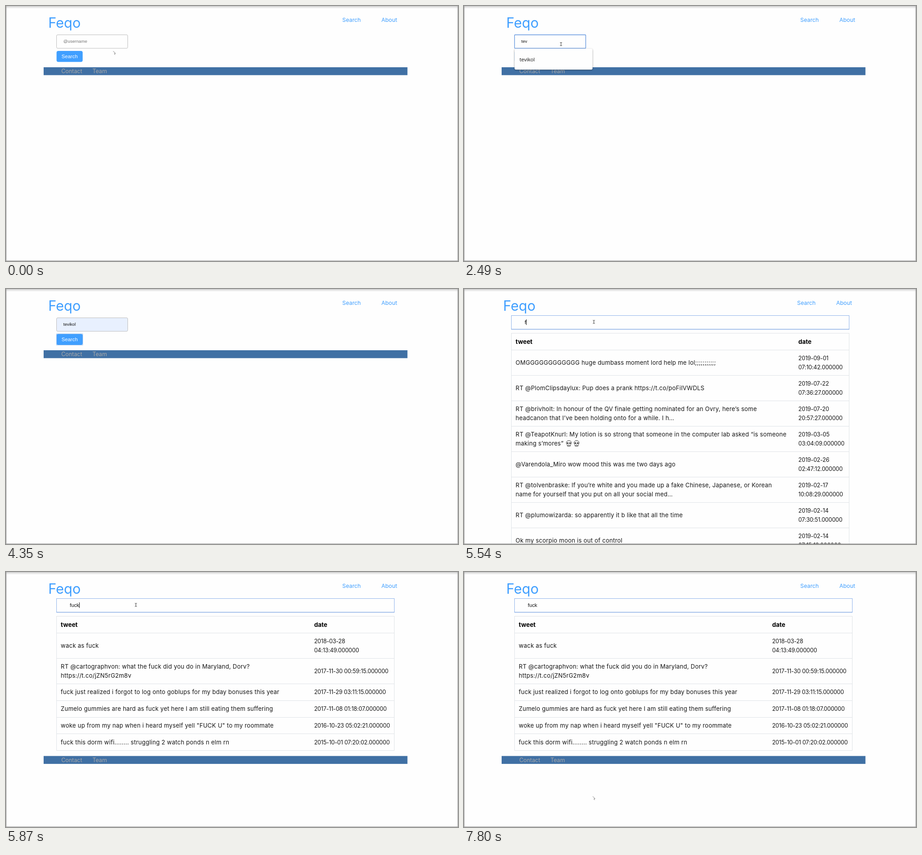
An HTML page for the animation above (8000 ms loop, 997 px wide and 562 px high).

```html
<!DOCTYPE html>
<html lang="en">
<head>
<meta charset="utf-8">
<title>Tweet search</title>
<style>
  html, body { margin: 0; width: 100%; height: 100%; overflow: hidden; background: #fefefe; }
  svg { display: block; width: 997px; height: 562px; }
  text { font: 13px Inter, sans-serif; white-space: pre; }
  .brand { font-size: 30.5px; fill: #409fff; }
  .nav { font-size: 12.3px; fill: #409fff; }
  .foot { font-size: 12.4px; fill: #a8a8a8; }
  .head { font-size: 13.4px; font-weight: 700; fill: #000; }
  .cell { letter-spacing: .24px; fill: #151515; }
  .date { font-size: 12.4px; letter-spacing: -.15px; fill: #151515; }
  .small { font: 9.6px "Liberation Sans", Arial, sans-serif; fill: #111; }
  .hint { fill: #757575; }
  .big { font: 11.24px "Liberation Sans", Arial, sans-serif; fill: #111; }
  .white { fill: #fff; }
  .item { font: 500 11.2px "Open Sans", "Noto Sans", sans-serif; fill: #111; }
  .pop { filter: drop-shadow(0 1px 1.5px rgba(0, 0, 0, .45)); }
</style>
</head>
<body>
<svg id="stage" viewBox="0 0 997 562">
  <g id="page"></g>
  <g id="cursor"></g>
  <path d="M0 3.5H997" stroke="#c4c4c4"/>
  <rect x=".5" y=".5" width="996" height="561" fill="none" stroke="#999"/>
</svg>
<script>
const LOOP = 8000;
const page = document.getElementById('page');
const pointer = document.getElementById('cursor');
const ruler = document.createElement('canvas').getContext('2d');

const user = 'tevikol';
const suggestions = [user, '_tkol', 'kol.tevia@example.com', 'tkol25', 'teviakol', 'norvek@example.net'];

// '|' marks a line break
const feed = [
  ['OMGGGGGGGGGGGG huge dumbass moment lord help me lol;;;;;;;;;;;', '2019-09-01 07:10:42'],
  ['RT @PlomClipsdaylux: Pup does a prank https://t.co/poFiIVWDLS', '2019-07-22 07:36:27'],
  ['RT @brivholt: In honour of the QV finale getting nominated for an Ovry, here’s some|headcanon that I’ve been holding onto for a while. I h…', '2019-07-20 20:57:27'],
  ['RT @TeapotKnurl: My lotion is so strong that someone in the computer lab asked “is someone|making s’mores” ☠', '2019-03-05 03:04:09'],
  ['@Varendola_Miro wow mood this was me two days ago', '2019-02-26 02:47:12'],
  ['RT @tolvenbraske: If you’re white and you made up a fake Chinese, Japanese, or Korean|name for yourself that you put on all your social med…', '2019-02-17 10:08:29'],
  ['RT @plumowizarda: so apparently it b like that all the time', '2019-02-14 07:30:51'],
  ['Ok my scorpio moon is out of control', '2019-02-14 07:15:18']
];
const hits = [
  ['wack as fuck', '2018-03-28|04:13:49'],
  ['RT @cartographvon: what the fuck did you do in Maryland, Dorv?|https://t.co/jZN5rG2m8v', '2017-11-30 00:59:15'],
  ['fuck just realized i forgot to log onto goblups for my bday bonuses this year', '2017-11-29 03:11:15'],
  ['Zumelo gummies are hard as fuck yet here I am still eating them suffering', '2017-11-08 01:18:07'],
  ['woke up from my nap when i heard myself yell "FUCK U" to my roommate', '2016-10-23 05:02:21'],
  ['fuck this dorm wifi........ struggling 2 watch ponds n elm rn', '2015-10-01 07:20:02']
];
const lists = { all: feed, some: [...feed, ...hits].filter(r => /f/i.test(r[0])), few: hits };

// Each step changes only the fields it names.
const steps = [
  [0, { list: '', value: '', caret: false, pop: 0, focus: '', fill: false, mark: false }],
  [900, { focus: 'field', pop: 6, caret: true }],
  [1300, { caret: false }],
  [1700, { value: user.slice(0, 1), pop: 1, caret: true }],
  [1850, { value: user.slice(0, 2) }],
  [1970, { value: user.slice(0, 3) }],
  [2490, { caret: false }],
  [2640, { value: user, fill: true, mark: true }],
  [2890, { pop: 0, mark: false }],
  [3010, { caret: true }],
  [3530, { focus: 'button', caret: false }],
  [5540, { list: 'all', value: 'f', caret: true }],
  [5690, { list: 'some', value: 'fu' }],
  [5870, { list: 'few', value: 'fuck' }],
  [6470, { caret: false }],
  [7020, { caret: true }],
  [7410, { caret: false }]
];
const moves = [
  [0, 'arrow', 236.5, 99.5], [120, 'arrow', 231.5, 97.5], [350, 'arrow', 229.5, 93.5],
  [490, 'beam', 214, 84], [3260, 'arrow', 185.5, 98.5], [3380, 'hand', 157, 114],
  [3930, 'arrow', 520.5, 320.5], [4050, 'arrow', 884.5, 523.5], [4350, 'none', 0, 0],
  [5540, 'beam', 286.5, 72.5], [6770, 'beam', 300, 162], [6890, 'beam', 714, 218],
  [7020, 'beam', 420, 265], [7140, 'beam', 137, 321], [7290, 'beam', 797, 338],
  [7410, 'beam', 783, 367], [7680, 'arrow', 500.5, 430.5], [7800, 'arrow', 284, 494.5]
];
const shapes = {
  none: '',
  arrow: '<path d="M0 0L5 5L2.5 5.5L4 8" fill="none" stroke="#666" stroke-width=".9"/>',
  beam: '<path d="M-2.2-3.5H-.5L0-3L.5-3.5H2.2M0-3V3M-2.2 3.5H-.5L0 3L.5 3.5H2.2" fill="none" stroke="#222" stroke-width=".9"/>',
  hand: '<path d="M2 .5V5L.7 4.2L.6 5.3L2.4 7.6H5.6L6.2 3.6L3.2 2.8V.5Z" fill="#fff" stroke="#333" stroke-width=".6"/>'
};

const text = (x, y, s, cls) => `<text x="${x}" y="${y}" class="${cls}">${s}</text>`;
const rect = (x, y, w, h, fill, more = '') =>
  `<rect x="${x}" y="${y}" width="${w}" height="${h}" fill="${fill}" ${more}/>`;
const at = (table, t) => table.filter(row => row[0] <= t).pop();

function caret(x, top, height, value, size) {
  ruler.font = `${size}px "Liberation Sans", Arial, sans-serif`;
  return rect(x + ruler.measureText(value).width, top, 1, height, '#000');
}

function skull(x, y) {
  return `<g transform="translate(${x} ${y})" stroke="#222" fill="#fff">
    <path d="M-3.4 3C-7 .5-6-6 0-6S7 .5 3.4 3V6H-3.4Z"/>
    <path d="M-1 4V6M1 4V6" stroke-width=".8"/>
    <g fill="#222" stroke="none"><circle cx="-2.5" cy="-.5" r="1.7"/><circle cx="2.5" cy="-.5" r="1.7"/><path d="M0 1L1 3H-1Z"/></g></g>`;
}

function lines(x, mid, s, cls) {
  const parts = s.split('|');
  return parts.map((part, i) => {
    const y = mid + (i - (parts.length - 1) / 2) * 19.3;
    const skulls = part.includes('☠') ? skull(x + 117.5, y) + skull(x + 134.5, y) : '';
    return text(x, y + 4.6, part.replace('☠', ''), cls) + skulls;
  }).join('');
}

function footer(y) {
  return rect(83, y, 802.5, 17.4, '#4070a4') +
    text(122, y + 13, 'Contact', 'foot') + text(190.7, y + 13, 'Team', 'foot');
}

function searchForm(s) {
  const focused = s.focus === 'field';
  let out = footer(135);
  out += rect(111.5, 63.5, 157, 29.7, s.fill ? '#e8f0fe' : '#fefefe',
    focused ? 'rx="1" stroke="#5f93dd" stroke-width="1.3"' : 'rx="2.5" stroke="#bdbdbd"');
  out += s.value ? text(126.6, 81, s.value, 'small') : text(126.6, 81, '@username', 'small hint');
  if (s.caret) out += caret(126.4, 73, 10.7, s.value, 9.6);
  out += rect(111.5, 99, 57.6, 24.2, '#409fff', 'rx="4"');
  if (s.focus === 'button') out += rect(111.5, 98.9, 57.8, 24.6, 'none', 'stroke="#8db7ea" stroke-width=".9"');
  out += text(122.6, 115.2, 'Search', 'big white');
  if (s.pop) {
    out += rect(111.5, 94, 172, 13.9 + 32.3 * s.pop, '#fefefe', 'rx="3" class="pop"');
    if (s.mark) out += rect(112, 101.5, 171, 31.5, '#ececec');
    suggestions.slice(0, s.pop).forEach((name, i) => {
      out += text(122.4, 121.6 + 32.3 * i, name, 'item');
    });
  }
  return out;
}

function results(s) {
  const short = s.list === 'few';
  const dateX = short ? 679.7 : 744.6;
  let out = rect(111.5, 58.5, 745, 30, '#fefefe', 'stroke="#8fb3ea"') +
    rect(111, 88, 746, 1.3, '#7ba3e2') + text(140.8, 77, s.value, 'big');
  if (s.caret) out += caret(140.8, 67, 12.2, s.value, 11.24);
  out += text(120.8, 120.7, 'tweet', 'head') + text(dateX, 120.7, 'date', 'head');
  let y = 134.5, rules = 'M111.5 97.5H856.5M111.5 134.5H856.5';
  for (const [body, day] of lists[s.list]) {
    const stamp = (short ? day : day.replace(' ', '|')) + '.000000';
    const h = (body + stamp).includes('|') ? 56 : 36.75;
    out += lines(120.8, y + h / 2, body, 'cell') + lines(dateX, y + h / 2, stamp, 'date');
    y += h;
    rules += `M111.5 ${Math.floor(y) + .5}H856.5`;
  }
  out += `<path d="${rules}M111.5 97V${y}M856.5 97V${y}" fill="none" stroke="#dfe3e7"/>`;
  return short ? out + footer(405.5) : out;
}

function drawPage(s) {
  // A page taller than the window is narrowed by its scrollbar.
  const shift = s.list && s.list !== 'few' ? -7 : 0;
  page.setAttribute('transform', `translate(${shift} 0)`);
  page.innerHTML = text(93.2, 47.5, 'Feqo', 'brand') +
    text(741.8, 35, 'Search', 'nav') + text(828, 35, 'About', 'nav') +
    (s.list ? results(s) : searchForm(s));
}

const start = performance.now();
let shown = '';
function frame() {
  const t = (performance.now() - start) % LOOP;
  const state = Object.assign({}, ...steps.filter(step => step[0] <= t).map(step => step[1]));
  const key = JSON.stringify(state);
  if (key !== shown) drawPage(state);
  shown = key;
  const [, kind, x, y] = at(moves, t);
  pointer.setAttribute('transform', `translate(${x} ${y})`);
  if (pointer.dataset.kind !== kind) pointer.innerHTML = shapes[kind];
  pointer.dataset.kind = kind;
  requestAnimationFrame(frame);
}
frame();
</script>
</body>
</html>
```
